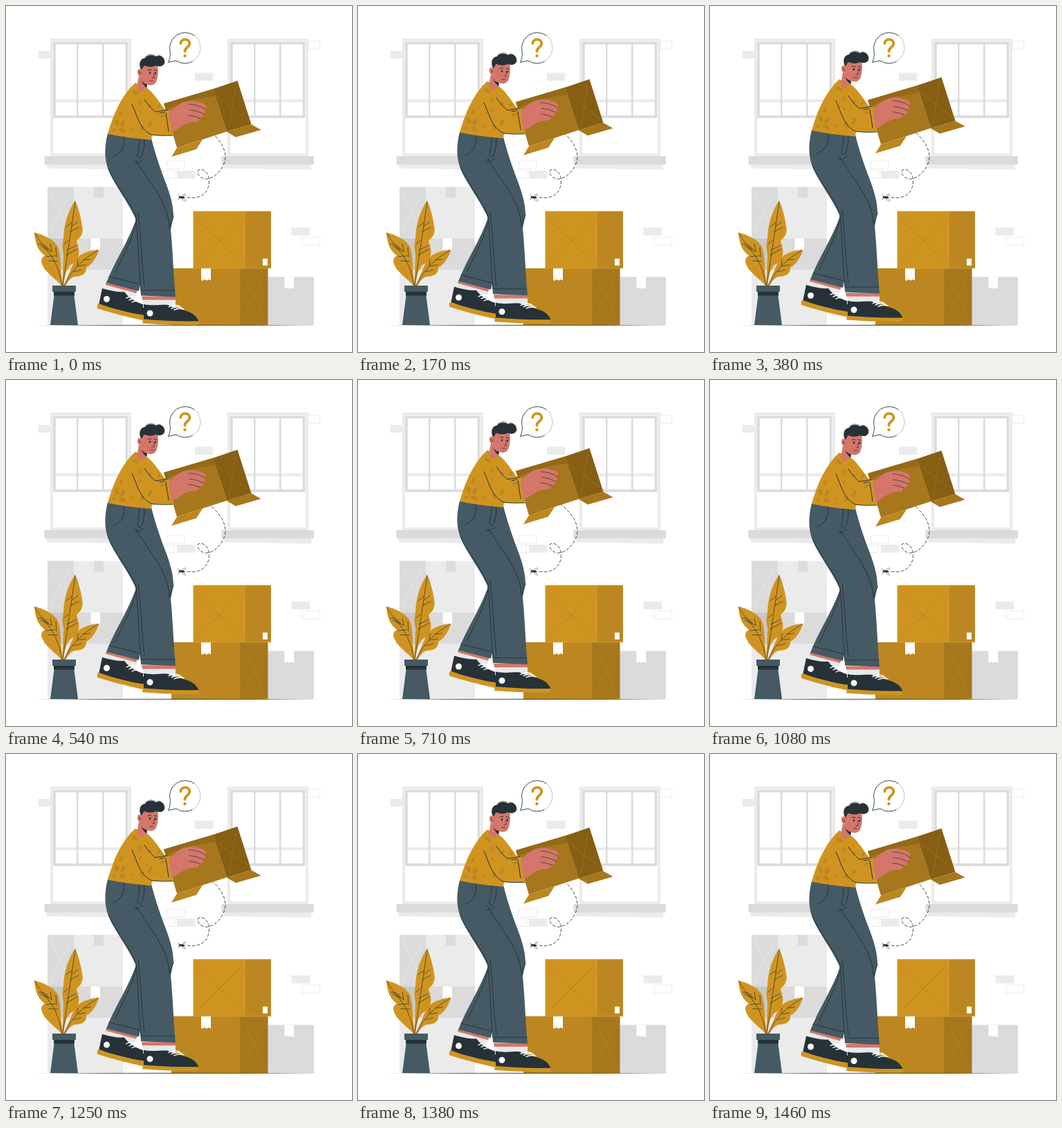
These frames come from a looping animation (500 px wide and 500 px high, 1500 ms). An HTML page with a canvas:

```html
<!DOCTYPE html>
<html lang="en">
<head>
<meta charset="utf-8">
<title>Moving boxes</title>
<style>
html, body { margin: 0; width: 100%; height: 100%; overflow: hidden; background: #fff; }
canvas { display: block; width: 500px; height: 500px; }
</style>
</head>
<body>
<canvas id="stage"></canvas>
<script>
const LOOP = 1500, STEPS = 36, LIFT = 10;
const GOLD = '#cf9420', GOLD_MID = '#bc8720', GOLD_DARK = '#a6771c', GOLD_DEEP = '#865f14';
const SLATE = '#455a64', INK = '#263238', SKIN = '#d4766a';
const PALE = '#ebebeb', GREY = '#dbdbdb', WHITE = '#fff';

const canvas = document.getElementById('stage');
const ratio = window.devicePixelRatio || 1;
canvas.width = canvas.height = 500 * ratio;
const c = canvas.getContext('2d');
c.lineCap = c.lineJoin = 'round';

function fill(color, d) {
  c.fillStyle = color;
  c.fill(new Path2D(d));
}
function line(color, width, d) {
  c.strokeStyle = color;
  c.lineWidth = width;
  c.stroke(new Path2D(d));
}
function box(color, left, top, right, bottom) {
  c.fillStyle = color;
  c.fillRect(left, top, right - left, bottom - top);
}
function frame(color, width, left, top, right, bottom) {
  c.strokeStyle = color;
  c.lineWidth = width;
  c.lineJoin = 'miter';
  c.strokeRect(left, top, right - left, bottom - top);
  c.lineJoin = 'round';
}
function oval(color, x, y, rx, ry = rx, turn = 0) {
  c.fillStyle = color;
  c.beginPath();
  c.ellipse(x, y, rx, ry, turn, 0, Math.PI * 2);
  c.fill();
}

function drawWindow(dx) {
  c.save();
  c.translate(dx, 0);
  frame(PALE, 4, 66, 49, 179, 215);
  box(PALE, 71, 135, 174, 139);
  frame(GREY, 3.6, 70, 53.5, 174.5, 160);
  box(GREY, 102, 54, 104.5, 160);
  box(GREY, 139, 54, 141.5, 160);
  box(GREY, 55.5, 217, 189, 229);
  fill(PALE, 'M59 229H185V236.5L59 234.5Z');
  c.restore();
}

function drawWall() {
  box(PALE, 46.5, 65, 64, 76);
  box(PALE, 273, 96.5, 299.5, 108);
  box(PALE, 247, 238, 273.5, 249.5);
  box(PALE, 412.5, 320, 439, 331.5);
  frame(PALE, 1, 437, 51, 453.5, 62.5);
  frame(PALE, 1, 232.5, 224, 258.5, 235.5);
  frame(PALE, 1, 218, 238, 243.5, 249.5);
  frame(PALE, 1, 428, 334, 453.5, 345.5);
  drawWindow(0);
  drawWindow(256);
}

function drawBoxes() {
  box(PALE, 60, 381, 169, 461);
  box(GREY, 55, 336, 169, 381);
  box('#c8c8c8', 55, 336, 92, 381);
  fill(WHITE, 'M122.5 336H136V353L132 351L129 353L126 351L122.5 353Z');
  box(PALE, 60, 261.5, 169, 336);
  box(GREY, 60, 261.5, 98, 336);
  line(PALE, .8, 'M65 272L93 325M93 272L65 325');
  fill(GREY, 'M127 261.5H141V278L137 276L134 278L130 276L127 278Z');

  box(GREY, 378, 391.5, 445, 461);
  fill(WHITE, 'M402.5 391.5H416V409L412 407L409 409L406 407L402.5 409Z');

  box(GOLD_MID, 239, 379, 338, 461);
  box(GOLD_DARK, 338, 379, 378.5, 461);
  line(GOLD_MID, .8, 'M338 379V461M345 391L372 447M372 391L345 447');
  fill(WHITE, 'M282 379H296V397L293 395L290 397L287 395L284 397L282 396Z');
  box(GOLD, 270.5, 296.5, 345, 379);
  box(GOLD_MID, 345, 296.5, 383, 379);
  line('#dcae50', .6, 'M345 297V379M270.5 379H383');
  line(GOLD_DARK, .7, 'M279 310L337 368M337 310L279 368');
  box(WHITE, 371, 365, 378, 375);
}

function drawPlant() {
  fill(GOLD, 'M41 327C55 331 70 338 75 348C80 360 78 380 82 404H80C74 396 60 388 53 375C49 367 52 362 57 361C48 356 42 345 41 327Z');
  fill(GOLD, 'M100 281C92 293 87 306 85 318C83 325 84 332 82 342C80 350 84 356 83 366L81 404H83C84 392 87 381 92 375C101 371 107 363 105 351C104 345 101 341 103 338C110 333 112 325 110 317C108 305 105 292 100 281Z');
  fill(GOLD, 'M134 352.5C122 353 108 357 102 365C95 374 91 390 83 404H86C91 396 95 391 101 391C110 391 117 386 116 378C124 374 131 364 134 352.5Z');
  line(INK, .7, 'M42 329C54 351 74 360 81 404M100 283Q91 345 82 404M133 353Q97 373 84 404');
  line(INK, .7, 'M47 344Q56 344 60 349M50 347L62 351M55 350L67 355M64 344L66 354M72 349L73 363M58 362L71 361M61 368L75 369');
  line(INK, .7, 'M104 312L95 318M105 320L93 326M87 319L95 313M102 346L88 353M103 351L87 360M84 344L90 339');
  line(INK, .7, 'M122 366L112 367M115 374L103 376M109 381L98 384M104 367L103 374');
  fill(SLATE, 'M70 415H98L104 461H64Z');
  box(INK, 69, 413, 99, 418.5);
  box(SLATE, 67, 404, 101, 413);
}

function drawBubble() {
  fill(WHITE, 'M246 79A22.5 22.5 0 1 0 237 65.5C238 70.5 237 76 234.5 81.5Q241 80 246 79Z');
  line(INK, .9, 'M272 42.5A22.5 22.5 0 0 0 237 65.5C238 70.5 237 76 234.5 81.5Q241 80 246 79A22.5 22.5 0 0 0 269 80.5');
  line(INK, .3, 'M272 42.5A22.5 22.5 0 0 1 269 80.5');
  line(GOLD, 3.8, 'M252.5 54C252.5 46.5 265.3 46.5 265.3 54.3C265.3 60 258.5 59.5 258.5 65.5');
  oval(GOLD, 258.5, 72, 2.2);
}

function drawFly() {
  c.setLineDash([4, 3]);
  line(INK, .85, 'M262 276.5C283 280 294 268 293.5 252C293 239 283 234 278 237C274 241 281 250 290 250C305 248 317 231 317 218C317 204 306 189 292 179');
  c.setLineDash([]);
  oval('#c8ced1', 257, 273.5, 4, 1.8, -.55);
  oval('#c8ced1', 257, 280, 4, 1.8, .55);
  oval(INK, 254, 276.5, 4.5, 1.4, .1);
  line(INK, .7, 'M249 273L252 278M249 280L252 275');
}

function drawCarriedBox() {
  fill(GOLD_DARK, 'M228 141L299 120L319 181.5L247 205Z');
  fill('#94691a', 'M228 141L299 120L303 130L267 136L231 149Z');
  fill(GOLD_DEEP, 'M299 120L334.5 108L354.5 171L319 181.5Z');
  line(GOLD_DARK, .7, 'M299 120L319 181M303 129L350 165M332 117L322 176');
  fill(GOLD_MID, 'M247 205L284 193L275 207L239 218Z');
  fill(GOLD_DARK, 'M318.5 181.5L354.5 171L368.5 179L332 189.5Z');
}

function drawShoes() {
  fill('#e8e8e8', 'M145 403L189 413L186 424L142 412Z');
  fill(SKIN, 'M145 399L190 410L188 415L144 403Z');
  fill(INK, 'M139 408C150 411 161 414 171 413C177 422 189 429 201 432V449L134 432Z');
  fill(GOLD, 'M134 430Q165 442 201 447V455Q163 447 132 437Q131 431 134 430Z');
  line(WHITE, 1.4, 'M174 422Q182 418 189 422M178 425Q186 421 193 424M182 428Q188 425 196 428');
  oval(WHITE, 145.5, 423.5, 4.5);

  fill('#e8e8e8', 'M198 424H245V436H198Z');
  fill(SKIN, 'M196 419.5H245V424.7H197Z');
  fill(INK, 'M199 431C213 434 224 431 234 432C247 440 273 438 278.5 456L199 455Z');
  fill(GOLD, 'M198 452.5C225 455 250 456 278 455.5Q280 460.5 275 461Q235 461.5 197 458.5Z');
  line(WHITE, 1.4, 'M235 435Q243 430 251 434M239 437Q247 433 254 436M243 439Q250 436 257 438');
  oval(WHITE, 208, 444, 4.5);
}

function drawTrousers() {
  fill(SLATE, 'M185 300L188 308C178 338 156 371 145 400L192 412L210 330Z');
  line(INK, .9, 'M188 313C181 343 165 368 158 386M149 391L193 402');
  fill(SLATE, 'M147 184L210 191C215 212 223 235 231 256C237 272 242 288 242 304L238 323C241 353 242 388 245 420.5L195 418.5C192 380 190 341 187 307C179 287 154 254 148 237C142 221 142 204 147 184Z');
  line(INK, .9, 'M148 235C155 255 182 286 188 306C191 342 192 380 195 411H244');
  line(INK, .9, 'M191 300C195 333 196 374 200 406');
  line(INK, 1, 'M170 189C173 203 166 214 155 218M193 192C193 204 190 212 190 218Q195 223 197 215Q201 203 200 193M185 227Q191 228 198 222');
  line(INK, 1, 'M187 222C208 257 234 283 236 319M242 304Q239 313 236 322');
}

function drawSpots() {
  const spots = [
    [187, 125, 5, 2.5], [194, 139, 2, 4], [166, 155, 2, 4],
    [160, 168, 3, 5], [169, 170, 3, 5], [156, 179, 3, 2], [168, 180, 5, 3],
    [181, 178, 2, 2], [208, 171, 2.5, 5], [197, 177, 3, 4],
    [194, 153, 2, 2], [208, 144, 3, 2], [221, 145, 2, 3], [227, 159, 4, 2]
  ];
  spots.forEach(([x, y, rx, ry], i) => oval(GOLD_MID, x, y, rx, ry, i % 2 ? -.3 : .45));
}

function drawTorso() {
  fill(GOLD, 'M187 111C177 119 167 134 159 151C152 167 149 178 147 185Q177 191 210 193.5L211 187L241 187L237 151L229 149C219 135 211 123 203 118Z');
  drawSpots();
  line(INK, 1, 'M182 142C190 159 193 178 210 186Q222 188 241 187M200 135Q209 148 216 153L234 150M222 155L230 153M231 155L235 181');
}

function drawHand() {
  fill(SKIN, 'M236 153C243 149 250 139 261 138C270 136 284 139 288 143Q291 148 287 150Q290 154 285 156.5Q287 161 279 162Q280 167 272 168C260 167 255 174 241 182Q236 167 236 153Z');
  line(INK, .7, 'M264 142Q277 142 288 149M265 150Q276 151 286 156M264 158Q273 159 280 162');
}

function drawHead() {
  fill(SKIN, 'M192 100L190 112Q188 121 192 123.5Q199 123 203 118L205 107Z');
  fill(INK, 'M195 107Q200 114 204 112L203.5 118Q199 116 195 107Z');
  fill(SKIN, 'M195 84L219 84Q221.5 99 217 110Q212 117 203 113Q196 110 195 101Q189 101 190 94Q191 89 195 92Z');
  fill(INK, 'M195 92C191 83 194 76 201 75C204 70 213 70 216 73C224 69 230 76 229 82C228 88 220 88 216 86C212 89 204 88 200 86C198 87 198 91 195 92Z');
  line(INK, .6, 'M202 73Q209 67 216 72M220 71Q230 73 229 83');
  line(INK, 1, 'M205 92.5Q207 91 210 92.5M214 92.5Q217 91.5 218 94');
  oval(INK, 208, 96.5, 1.2, 1.8);
  oval(INK, 216, 97, 1.1, 1.8);
  line(INK, .8, 'M214 97L214 104L211 104M208 108L213 108.5M192 95Q195 95 194 99');
}

function drawMover(lift) {
  c.save();
  c.translate(0, -lift);
  drawCarriedBox();
  drawShoes();
  drawTrousers();
  drawTorso();
  drawHead();
  drawHand();
  c.restore();
}

function render(now) {
  // The motion advances at 24 steps per second, rising and sinking linearly.
  const step = Math.floor((now % LOOP) / LOOP * STEPS + .05) % STEPS;
  const lift = LIFT * (1 - Math.abs(1 - 2 * step / STEPS));
  c.setTransform(ratio, 0, 0, ratio, 0, 0);
  box(WHITE, 0, 0, 500, 500);
  drawWall();
  drawBoxes();
  drawPlant();
  fill(INK, 'M43 461.3Q249 460.3 455 461.3Q249 462.3 43 461.3Z');
  drawBubble();
  drawFly();
  drawMover(lift);
}

const start = performance.now();
function tick() {
  render(performance.now() - start);
  requestAnimationFrame(tick);
}
tick();
</script>
</body>
</html>
```
